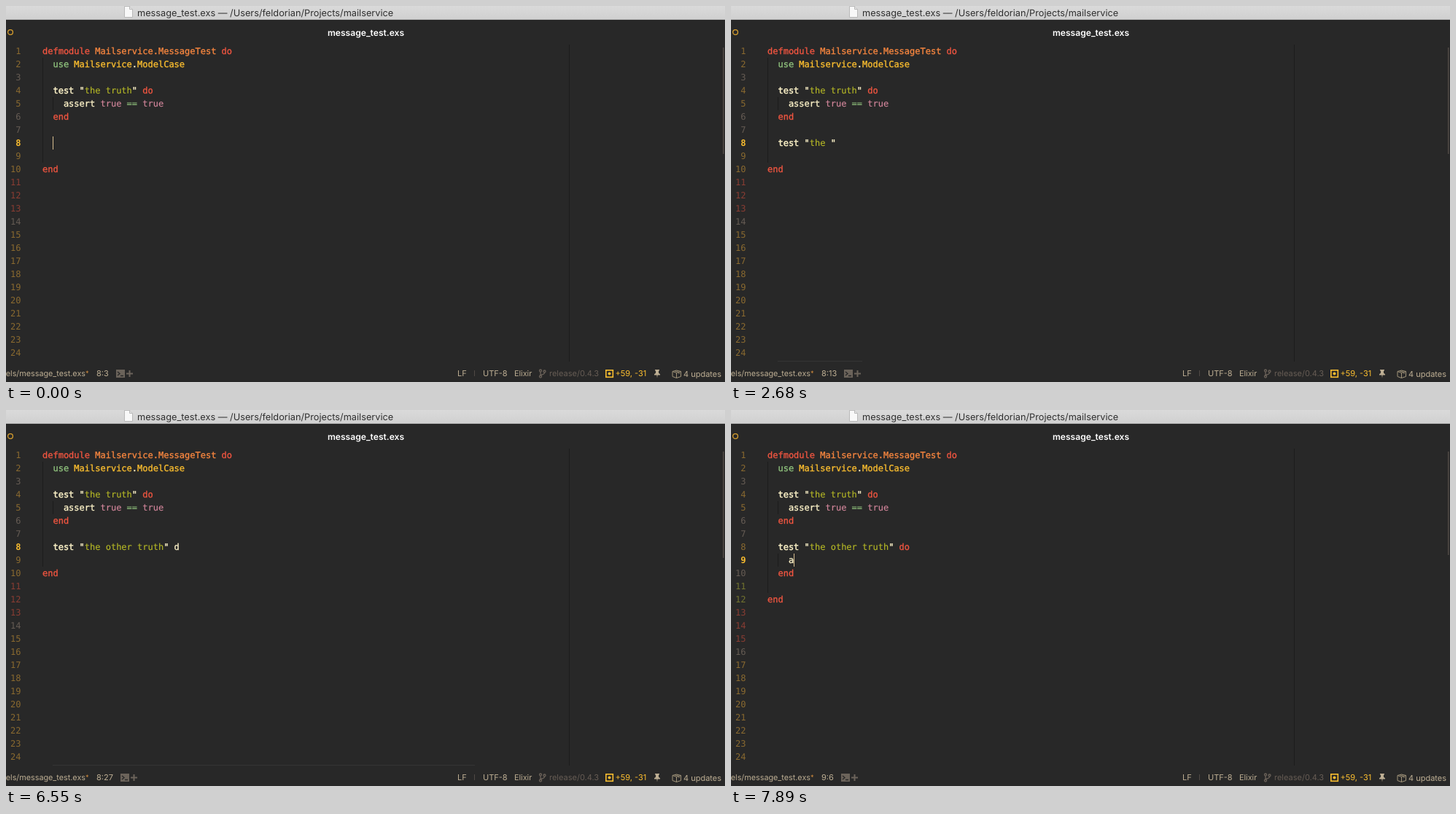
An HTML page that plays this animation: 986x516 px, repeating every 8000 ms.

```html
<!DOCTYPE html>
<html lang="en">
<head>
<meta charset="utf-8">
<title>Code editor</title>
<style>
  html, body { margin: 0; width: 100%; height: 100%; overflow: hidden; background: #282828; }
  svg { display: block; width: 986px; height: 516px; }
  text { white-space: pre; text-rendering: geometricPrecision; font-family: Inter, sans-serif; }
  .code { font: 12px "DejaVu Sans Mono", monospace; }
  .item { font: 13px "DejaVu Sans Mono", monospace; }
  .hint { font-size: 11.5px; }
  .status { font-size: 11px; fill: #bdae93; }
</style>
</head>
<body>
<svg viewBox="0 0 986 516" xmlns="http://www.w3.org/2000/svg">
  <defs>
    <linearGradient id="bar" x2="0" y2="1">
      <stop stop-color="#dadada"/><stop offset="1" stop-color="#d0d0d0"/>
    </linearGradient>
  </defs>
  <rect width="986" height="516" fill="#282828"/>
  <rect width="986" height="18" fill="url(#bar)"/>
  <rect y="18" width="986" height="1" fill="#b4b4b4"/>
  <path d="M162.5 .5h7l4 4v11h-11z" fill="#f8f8f8" stroke="#b9b9b9"/>
  <path d="M169.5 .5v4h4" fill="#e2e2e2" stroke="#b9b9b9"/>
  <text x="180" y="13.5" font-size="12.75" fill="#303030">message_test.exs — /Users/feldorian/Projects/mailservice</text>
  <circle cx="6" cy="36" r="3.4" fill="none" stroke="#d9a02f" stroke-width="1.3"/>
  <text x="493.5" y="41" font-size="12.1" font-weight="600" text-anchor="middle" fill="#fff">message_test.exs</text>
  <rect x="772" y="53" width="1" height="435" fill="#1d1d1d"/>

  <g id="view"></g>

  <g class="status">
    <text x="109" y="508" font-size="10.8" text-anchor="end">els/message_test.exs</text>
    <text x="109" y="507" font-size="9" fill="#d08a3c">*</text>
    <text id="position" x="124" y="508"></text>
    <g id="terminal">
      <rect y="499" width="12" height="11" fill="#6b635a"/>
      <path d="M2 502l3 2.5-3 2.5M6 507.5h4" fill="none" stroke="#282828" stroke-width="1.3"/>
      <path d="M14 504.5h9M18.5 500v9" stroke="#6b635a" stroke-width="2"/>
    </g>
    <text x="619" y="508">LF</text>
    <rect x="642" y="500" width="1" height="8" fill="#504945"/>
    <text x="654" y="508">UTF-8</text>
    <text x="697" y="508" font-size="10.8">Elixir</text>
    <g fill="none" stroke="#6b6259" stroke-width="1.3">
      <circle cx="733" cy="500.5" r="1.5"/><circle cx="733" cy="508.5" r="1.5"/><circle cx="738.5" cy="501.5" r="1.5"/>
      <path d="M733 502v5M738.5 503q0 2.5-5.5 3.5"/>
    </g>
    <text x="745" y="508" fill="#665c54">release/0.4.3</text>
    <rect x="822.8" y="499.8" width="9.5" height="9.5" fill="none" stroke="#fabd2f" stroke-width="1.6"/>
    <circle cx="827.5" cy="504.5" r="2" fill="#fabd2f"/>
    <text x="835.5" y="508" fill="#fabd2f">+59, -31</text>
    <path d="M890 499h6v1.3l-1 .5v3l2 1.5v1.2h-3.4l-.6 4-.6-4H889v-1.2l2-1.5v-3l-1-.5z" fill="#bdae93"/>
    <path d="M914 501.5l5.500-1.500 6 1.500v7l-6 2-5.500-2zM914 501.500l5.500 2 6-2M919.500 503.500v7M917 500.700l6 2v2.300" fill="none" stroke="#a09379"/>
    <text x="929" y="509">4 updates</text>
  </g>
</svg>
<script>
const LOOP = 8000, CHAR = 7.224;
const RED = '#ee5540', ORANGE = '#f5853f', AQUA = '#8ec07c', YELLOW = '#fabd2f',
      CREAM = '#fbf1c7', GREEN = '#b8bb26', PINK = '#d3869b';
const GUTTER = { g: '#665c54', o: '#8a6a30', r: '#8a3d33', a: '#73742f' };
const TYPED = 'test "the other truth" do';

// [time, cursor column, cursor visible, right edge of suggestion list]
const STEPS = [
  [0, 2, 1], [450, 2, 0], [900, 4, 1], [1040, 6, 1], [1340, 7, 1],
  [1630, 8, 1], [1780, 9, 1], [1930, 11, 1], [2080, 12, 1], [2680, 12, 0], [2980, 12, 1],
  [3420, 13, 1], [3570, 14, 1], [3720, 15, 1], [3870, 17, 1],
  [4020, 18, 1], [4170, 20, 1], [4310, 21, 1], [4460, 23, 1], [4910, 23, 0],
  [5360, 25, 1], [5510, 26, 1, 618], [5810, 27, 1, 618], [5960, 26, 1, 618], [6110, 26, 1], [6550, 26, 0],
  [6850, 27, 1], [7000, 27, 1, 660], [7150, 27, 1, 533],
  [7440, 4, 1], [7740, 4, 1], [7890, 5, 1]
];
// [from, right edge] of the faint rule above the status bar
const RULES = [[0, 0], [900, 174], [1630, 180], [3420, 222], [5360, 643], [6850, 692], [7440, 0]];
const ITEMS = [
  ['do', 'do'], ['doc', 'doc'], ['defmacro', 'defmacro'], ['defover', 'defoverridable'],
  ['defmacrop', 'defmacrop'], ['defmodule', 'defmodule'], ['defpro', 'defprotocol'],
  ['doctest(mod, opts \\\\ [])', 'ExUnit.DocTest']
];

const byId = id => document.getElementById(id);
const view = byId('view'), position = byId('position'), terminal = byId('terminal');
const rect = (x, y, w, h, fill, rx = 0) =>
  `<rect x="${x}" y="${y}" width="${w}" height="${h}" rx="${rx}" fill="${fill}"/>`;
const label = (x, y, cls, fill, str, extra = '') =>
  `<text class="${cls}" x="${x}" y="${y}" fill="${fill}" ${extra}>${str}</text>`;
const rowTop = row => 53 + 18 * (row - 1);
const token = (row, col, fill, str, weight = .35) =>
  label(50 + col * CHAR, rowTop(row) + 13, 'code', fill, str, `stroke="${fill}" stroke-width="${weight}"`);
const guide = (x, from, to) => rect(x, rowTop(from), 1, 18 * (to - from + 1), '#1c1c1c');

const HEAD = [
  token(1, 0, RED, 'defmodule'), token(1, 10, ORANGE, 'Mailservice.MessageTest'), token(1, 34, RED, 'do'),
  token(2, 2, AQUA, 'use'), token(2, 6, YELLOW, 'Mailservice'), token(2, 17, CREAM, '.'),
  token(2, 18, YELLOW, 'ModelCase'),
  token(5, 4, CREAM, 'assert'), token(5, 11, PINK, 'true', .15), token(5, 16, AQUA, '==', .15),
  token(5, 19, PINK, 'true', .15), token(6, 2, RED, 'end')
].join('');

function testLine(row, typed) {
  const n = typed.length, inner = typed.slice(6, typed.lastIndexOf('"') > 5 ? typed.lastIndexOf('"') : n);
  const tail = typed.slice(7 + inner.length).trim();
  let out = token(row, 2, CREAM, typed.slice(0, 4), .5);
  if (n > 5) out += token(row, 7, CREAM, '"', .4) + token(row, 8, GREEN, inner, .12)
    + token(row, 8 + inner.length, CREAM, '"', .4);
  if (tail) out += token(row, 10 + inner.length, tail === 'do' ? RED : CREAM, tail);
  return out;
}

function gutter(current, expanded, settled) {
  const kinds = expanded
    ? 'oogoogg' + (settled ? 'oagaa' : 'ooggg') + 'rrrgoooooooo'
    : 'oogooggoo' + 'orrrgoooooooooo';
  return [...kinds].slice(0, 24).map((kind, i) => {
    const on = i + 1 === current;
    return label(20.5, rowTop(i + 1) + 13, 'code', on ? YELLOW : GUTTER[kind], i + 1,
      `text-anchor="end" ${on ? 'font-weight="bold" style="font-weight:bold"' : ''}`);
  }).join('');
}

function menu(right) {
  const left = 197, top = 198, width = right - left, height = 26 * ITEMS.length;
  let out = rect(171, 192, width + 51, 252, '#252525', 38) + rect(197, 198, width, 218, '#202020', 22)
    + rect(left, top, width + .5, height + .5, '#3a3a3a', 3) + rect(left, top, width - .5, height - .5, '#1d1d1d', 3);
  ITEMS.forEach(([name, hint], i) => {
    const y = top + 26 * i, first = i === 0, last = i === ITEMS.length - 1;
    if (first) out += rect(left, y, width, 26, '#373737', 3);
    out += rect(left, y, 26, 26, first ? '#4b523d' : last ? '#293844' : '#393e2d');
    out += last
      ? label(210, y + 18, 'item', '#9db88c', 'm', 'text-anchor="middle" style="font-weight:bold"')
      : `<path d="M203.500 ${y + 14}h8M209 ${y + 10.500}l4 3.500-4 3.500zM215.500 ${y + 10}v8" fill="#a3b878" stroke="#a3b878" stroke-width="1.800"/>`;
    out += label(232, y + 17, 'item', first ? '#fff' : '#bfb8a6', name, first ? 'style="font-weight:bold"' : '')
      + label(436, y + 17, 'hint', first ? '#aaa69c' : '#6e6a64', hint);
  });
  return out;
}

function render([time, col, visible, menuRight]) {
  const expanded = time >= 7440, row = expanded ? 9 : 8;
  const ruleRight = RULES.filter(([from]) => from <= time).pop()[1];
  let out = gutter(row, expanded, time >= 7740)
    + guide(50, 2, expanded ? 11 : 9) + guide(64, 5, 5) + HEAD
    + testLine(4, 'test "the truth" do')
    + testLine(8, expanded ? TYPED : TYPED.slice(0, col - 2));
  if (expanded) {
    out += guide(64, 9, 9) + token(10, 2, RED, 'end') + token(12, 0, RED, 'end');
    if (col > 4) out += token(9, 4, CREAM, 'a');
  } else out += token(10, 0, RED, 'end');
  if (ruleRight) out += rect(64, 487, ruleRight - 64, 1, '#353535');
  if (menuRight) out += menu(menuRight);
  if (visible) out += rect(Math.round(50 + col * CHAR), rowTop(row) - (expanded ? 0 : 0), 1, 18, '#d6bd8e');
  out += rect(983, 57, 1.5, expanded ? 142 : 146, '#504a45');
  view.innerHTML = out;
  position.textContent = `${row}:${col + 1}`;
  terminal.setAttribute('transform', `translate(${Math.round(134 + position.getComputedTextLength())} 0)`);
}

let shown = -1;
function tick() {
  const t = performance.now() % LOOP;
  const index = STEPS.findLastIndex(step => step[0] <= t);
  if (index !== shown) render(STEPS[shown = index]);
  requestAnimationFrame(tick);
}
tick();
</script>
</body>
</html>
```
